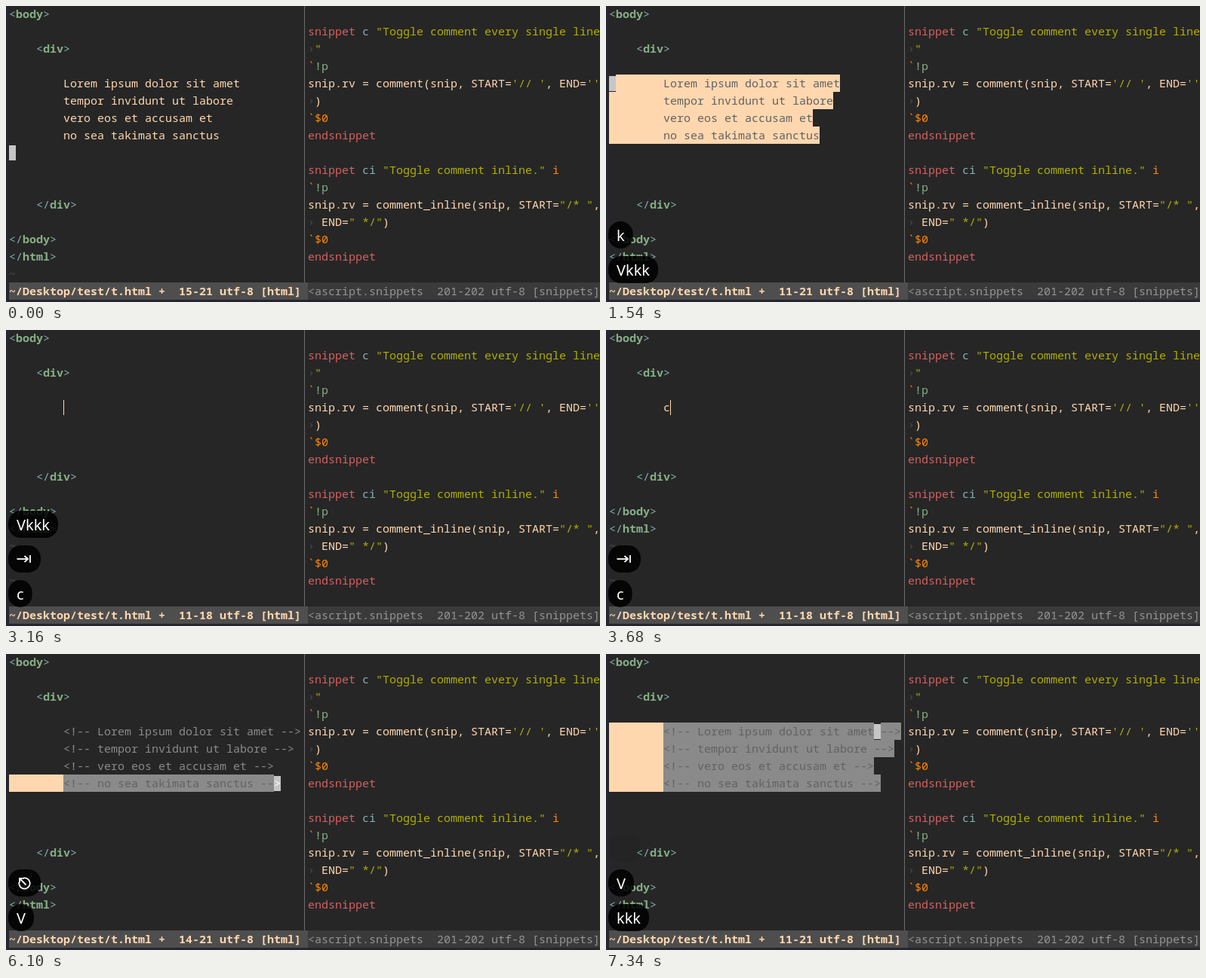
Animation of 787x393 px, one loop 8000 ms. Source, as an HTML page with a canvas:

```html
<!DOCTYPE html>
<html lang="en">
<head>
<meta charset="utf-8">
<title>Editor snippets</title>
<style>
html, body { margin: 0; width: 100%; height: 100%; overflow: hidden; background: #262626; }
canvas { display: block; }
</style>
</head>
<body>
<canvas id="stage" width="787" height="393"></canvas>
<script>
const ctx = document.getElementById('stage').getContext('2d');
const LOOP = 8000, CELL = 9, ROW = 23, LEFT = 4, RIGHT = 400, FADE_STEP = 56;
const C = {
  bg: '#262626', edge: '#26262f', fg: '#ffd7af', gray: '#8a8a8a', dim: '#4e4e4e', sel: '#626262',
  red: '#d75f5f', green: '#afaf00', aqua: '#87af87', blue: '#87afaf', orange: '#ff8700', cursor: '#c6c6c6'
};
const LINES = ['Lorem ipsum dolor sit amet', 'tempor invidunt ut labore', 'vero eos et accusam et', 'no sea takimata sanctus'];
const FIRST = 4, LAST = 7, INDENT = 8;

// Editor state from each moment on; fields carry over to the next entry.
const script = [
  [0, { mode: 'plain', row: 8, col: 0, cursor: 'block', visual: false }],
  [60, { row: 7 }],
  [960, { visual: true }],
  [1190, { row: 6 }],
  [1360, { row: 5 }],
  [1540, { row: 4 }],
  [2500, { cursor: 'none' }],
  [2560, { mode: 'empty', visual: false, cursor: 'bar', col: 8 }],
  [3220, { mode: 'typed', col: 9 }],
  [3920, { mode: 'comment', row: 7, col: 40 }],
  [5170, { cursor: 'block', col: 39 }],
  [5880, { visual: true }],
  [6640, { row: 6, col: 38 }],
  [6880, { row: 5, col: 39 }],
  [7050, { row: 4 }]
];

// Key bubbles: label changes, start of the fade, its steps and what stays behind.
const keys = [
  { labels: [[60, 'k']], fade: 2080, steps: 3 },
  { labels: [[960, 'V'], [1190, 'Vk'], [1360, 'Vkk'], [1540, 'Vkkk']], fade: 3510, steps: 4 },
  { labels: [[2500, 'tab']], fade: 4460, steps: 4, rest: 0.06, until: 5170 },
  { labels: [[3160, 'c']], fade: 5226, steps: 3 },
  { labels: [[3860, 'tab']], fade: 5930, steps: 4 },
  { labels: [[5170, 'esc']], fade: 7170, steps: 4, rest: 0.06, until: LOOP },
  { labels: [[5880, 'V']], fade: LOOP, steps: 1 },
  { labels: [[6640, 'k'], [6880, 'kk'], [7050, 'kkk']], fade: LOOP, steps: 1 }
];

const comment = [['`', C.orange], ['!p', C.aqua]];
const tail = [['`$0', C.orange]];
const end = [['endsnippet', C.red]];
const rightPane = {
  1: [['snippet ', C.red], ['c ', C.blue], ['"Toggle comment every single line', C.green]],
  2: [['›', C.dim], ['"', C.green]],
  3: comment,
  4: [['snip.rv = comment(snip, START=', C.fg], ["'// '", C.green], [', END=', C.fg], ["''", C.green]],
  5: [['›', C.dim], [')', C.fg]],
  6: tail,
  7: end,
  9: [['snippet ', C.red], ['ci ', C.blue], ['"Toggle comment inline." ', C.green], ['i', C.orange]],
  10: comment,
  11: [['snip.rv = comment_inline(snip, START=', C.fg], ['"/* "', C.green], [',', C.fg]],
  12: [['›', C.dim], [' END=', C.fg], ['" */"', C.green], [')', C.fg]],
  13: tail,
  14: end
};

function rect(x, y, w, h, color) {
  ctx.fillStyle = color;
  ctx.fillRect(x, y, w, h);
}

function cells(col, row, count, color) {
  rect(LEFT + col * CELL, row * ROW - 1, count * CELL, ROW, color);
}

function put(x, row, text, color, weight = 500) {
  ctx.font = weight + ' 15px "Noto Sans Mono", monospace';
  ctx.fillStyle = color;
  ctx.fillText(text, x, row * ROW + 16);
}

function runs(x, row, parts) {
  for (const [text, color, weight] of parts) {
    put(x, row, text, color, weight);
    x += text.length * CELL;
  }
}

function tag(col, row, name, open = '<') {
  runs(LEFT + col * CELL, row, [[open, C.blue], [name, C.aqua, 700], ['>', C.blue]]);
}

function stateAt(t) {
  const s = {};
  for (const [at, change] of script) if (at <= t) Object.assign(s, change);
  return s;
}

function drawLine(i, s) {
  const row = FIRST + i, commented = s.mode === 'comment';
  const text = commented ? '<!-- ' + LINES[i] + ' -->' : LINES[i];
  const selected = s.visual && row >= s.row;
  if (selected) {
    cells(0, row, INDENT, C.fg);
    cells(INDENT, row, text.length, commented ? C.gray : C.fg);
    if (row === s.row) cells(s.col, row, 1, C.bg);
  } else if (commented && row === LAST && !s.visual) {
    cells(INDENT, row, 1, C.sel);
    cells(INDENT + text.length - 1, row, 1, C.sel);
  }
  put(LEFT + INDENT * CELL, row, text, selected ? C.sel : commented ? C.gray : C.fg);
}

function drawCursor(s) {
  const x = LEFT + s.col * CELL, y = s.row * ROW + 1;
  if (s.cursor === 'bar') rect(x, y, 1, 20, C.fg);
  if (s.cursor !== 'block') return;
  rect(x, y, CELL, 20, C.cursor);
  if (s.mode === 'comment' && s.row <= LAST) {
    const text = '<!-- ' + LINES[s.row - FIRST] + ' -->';
    put(x, s.row, text[s.col - INDENT], '#ffffff');
  }
}

function drawLeft(s) {
  const short = s.mode === 'empty' || s.mode === 'typed', shift = short ? 3 : 0;
  tag(0, 0, 'body');
  tag(4, 2, 'div');
  if (s.mode === 'typed') put(LEFT + INDENT * CELL, FIRST, 'c', C.fg);
  if (!short) LINES.forEach((_, i) => drawLine(i, s));
  tag(4, 11 - shift, 'div', '</');
  tag(0, 13 - shift, 'body', '</');
  tag(0, 14 - shift, 'html', '</');
  for (let row = 15 - shift; row < 16; row++) put(LEFT, row, '~', C.dim);
  drawCursor(s);
  const pos = (s.row + 7) + '-' + (short ? 18 : 21);
  rect(LEFT, 367, RIGHT - LEFT, ROW, C.dim);
  put(LEFT, 16, '~/Desktop/test/t.html +  ' + pos + ' utf-8 [html]', C.fg, 600);
}

function drawRight() {
  rect(395, 0, 1, 367, '#6c6c6c');
  for (const row in rightPane) runs(RIGHT, +row, rightPane[row]);
  rect(RIGHT, 367, 787 - RIGHT, ROW, '#3a3a3a');
  put(RIGHT, 16, '<ascript.snippets  201-202 utf-8 [snippets]', '#949494');
}

function stroke(points) {
  ctx.beginPath();
  points.forEach(([x, y]) => ctx.lineTo(x, y));
  ctx.stroke();
}

const icons = {
  tab(x, y) {
    stroke([[x, y], [x + 14, y]]);
    stroke([[x + 10, y - 4], [x + 14.5, y], [x + 10, y + 4]]);
    stroke([[x + 17.5, y - 5], [x + 17.5, y + 5]]);
  },
  esc(x, y) {
    const cx = x + 10, cy = y + 0.5;
    ctx.beginPath();
    ctx.arc(cx, cy, 7.2, -Math.PI * 0.56, Math.PI * 1.06);
    ctx.stroke();
    stroke([[cx + 2, cy + 2], [cx - 6, cy - 6]]);
    stroke([[cx - 6.5, cy - 1], [cx - 6.5, cy - 6.5], [cx - 1, cy - 6.5]]);
  }
};

function drawBubble(label, slot, alpha) {
  const top = 332 - slot * 46, icon = icons[label];
  ctx.font = '20px "Noto Sans", sans-serif';
  const width = (icon ? 21 : ctx.measureText(label).width) + 22;
  ctx.globalAlpha = alpha;
  ctx.fillStyle = 'rgba(0,0,0,0.86)';
  ctx.beginPath();
  ctx.roundRect(3, top, width, 36, Math.min(16.5, width / 2));
  ctx.fill();
  ctx.fillStyle = ctx.strokeStyle = '#ffffff';
  ctx.lineWidth = 1.8;
  if (alpha > 0.1) {
    if (icon) icon(14.5, top + 18);
    else ctx.fillText(label, 14, top + 26);
  }
  ctx.globalAlpha = 1;
}

function fadeOf(key, t) {
  if (t < key.fade) return 1;
  const done = Math.floor((t - key.fade) / FADE_STEP) + 1;
  if (done < key.steps) return 1 - done / key.steps;
  return t < key.until ? key.rest : 0;
}

function drawKeys(t) {
  const shown = keys.filter(k => k.labels[0][0] <= t);
  shown.forEach((key, i) => {
    const alpha = fadeOf(key, t);
    const label = key.labels.filter(([at]) => at <= t).pop()[1];
    if (alpha > 0) drawBubble(label, shown.length - 1 - i, alpha);
  });
}

function draw(t) {
  rect(0, 0, 787, 393, C.bg);
  rect(0, 0, LEFT, 393, C.edge);
  rect(0, 390, 787, 3, C.edge);
  drawLeft(stateAt(t));
  drawRight();
  drawKeys(t);
}

function tick() {
  draw(performance.now() % LOOP);
  requestAnimationFrame(tick);
}
tick();
</script>
</body>
</html>
```
